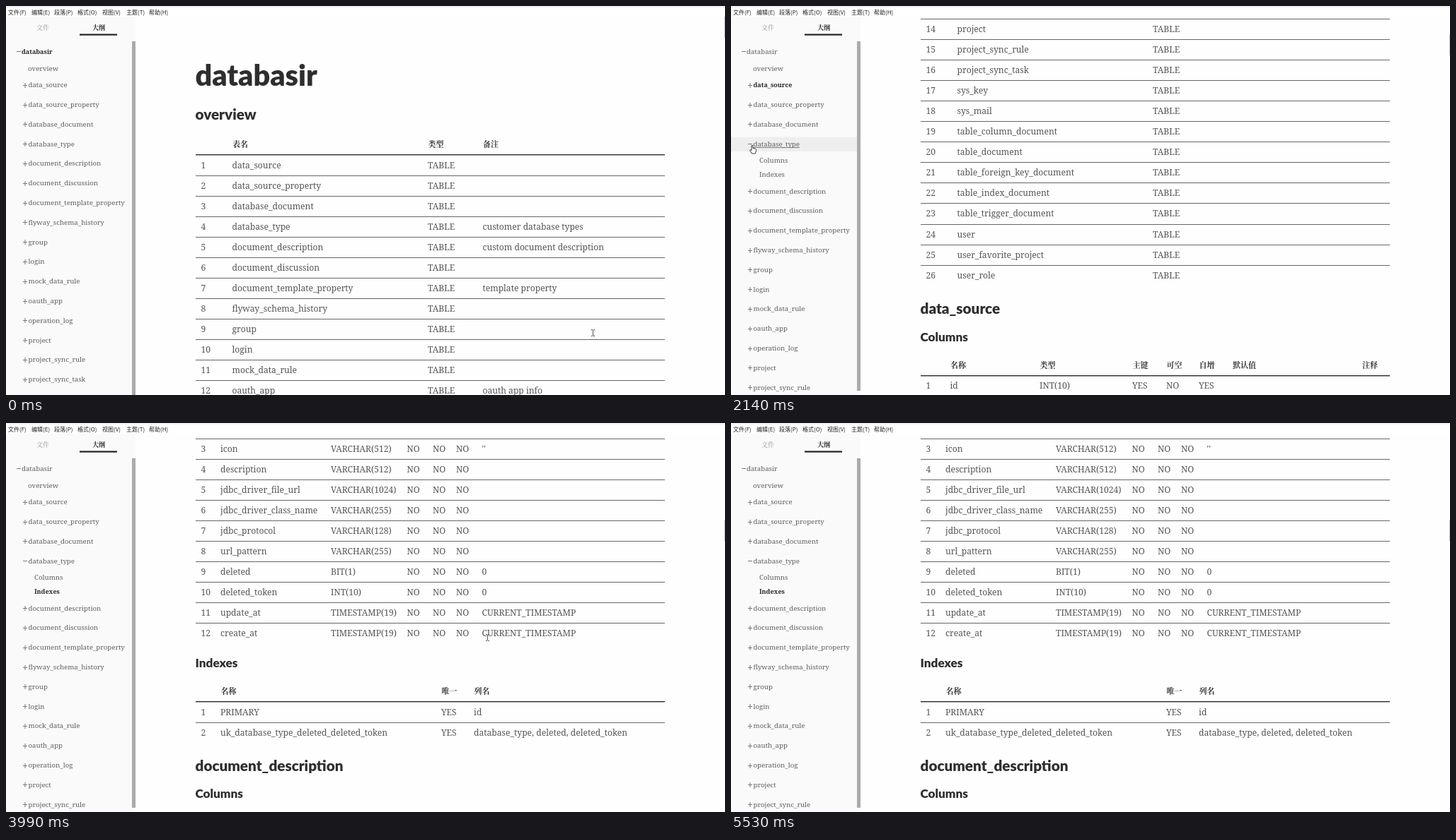
An HTML page with a canvas that plays this animation: 1016 by 551 pixels, repeating every 6590 ms.

```html
<!DOCTYPE html>
<html lang="zh">
<head>
<meta charset="utf-8">
<title>databasir</title>
<style>
  html, body { margin: 0; width: 100%; height: 100%; overflow: hidden; background: #fff; }
  canvas { display: block; width: 1016px; height: 551px; }
</style>
</head>
<body>
<canvas id="stage"></canvas>
<script>
const W = 1016, H = 551, LOOP = 6590, STEP = LOOP / 99;
const ROW = 29.09, LEFT = 268, RIGHT = 931, TOP = 15;
const TYPE_TOP = 2545;            // document offset of the database_type section
const CJK = '"Noto Serif CJK SC", "Noto Sans CJK SC", "Noto Sans CJK", serif';
const FONT = {
  body: '300 12.12px "Noto Serif", serif',
  side: '300 9.66px "Noto Serif", serif',
  sideBold: 'bold 9px "Noto Serif", serif',
  head: 'bold 11px ' + CJK,
  tab: '9px ' + CJK,
  tabBold: 'bold 9px ' + CJK,
  menu: '8px "Noto Sans CJK SC", "Noto Sans CJK", sans-serif',
  h1: '900 41.3px Lato, sans-serif',
  h2: '900 20.7px Lato, sans-serif',
  h3: '900 17.2px Lato, sans-serif'
};

const canvas = document.getElementById('stage');
const ctx = canvas.getContext('2d');
const dpr = window.devicePixelRatio || 1;
canvas.width = W * dpr;
canvas.height = H * dpr;

const names = ('data_source data_source_property database_document database_type ' +
  'document_description document_discussion document_template_property ' +
  'flyway_schema_history group login mock_data_rule oauth_app operation_log project ' +
  'project_sync_rule project_sync_task sys_key sys_mail table_column_document ' +
  'table_document table_foreign_key_document table_index_document ' +
  'table_trigger_document user user_favorite_project user_role').split(' ');

const notes = {
  database_type: 'customer database types',
  document_description: 'custom document description',
  document_template_property: 'template property',
  oauth_app: 'oauth app info'
};

// "name type value" lines into column rows; the first row is the primary key
const fields = list => list.split('\n').map((line, i) => {
  const [name, type, value = '', nullable = 'NO'] = line.trim().split(' ');
  const key = i ? 'NO' : 'YES';
  return [name, type, key, nullable, key, value];
});

const typeRows = fields(`id INT(10)
  database_type VARCHAR(128)
  icon VARCHAR(512) ''
  description VARCHAR(512)
  jdbc_driver_file_url VARCHAR(1024)
  jdbc_driver_class_name VARCHAR(255)
  jdbc_protocol VARCHAR(128)
  url_pattern VARCHAR(255)
  deleted BIT(1) 0
  deleted_token INT(10) 0
  update_at TIMESTAMP(19) CURRENT_TIMESTAMP
  create_at TIMESTAMP(19) CURRENT_TIMESTAMP`);
typeRows[1].push('such as mysql,\npostgresql,\nmysql5.5 and so\non');

const descRows = fields(`id INT(10)
  content TEXT(65535)
  project_id INT(10)
  table_name VARCHAR(255)
  column_name VARCHAR(255) null YES
  update_by INT(10)
  update_at TIMESTAMP(19) CURRENT_TIMESTAMP
  create_at TIMESTAMP(19) CURRENT_TIMESTAMP`);

const columnHeads = ['名称', '类型', '主键', '可空', '自增', '默认值', '注释'];
const tallHeads = columnHeads.map((h, i) => i > 1 && i < 5 ? h[0] + '\n' + h[1] : h);

const headings = [
  ['h1', 'databasir', 112.5], ['h2', 'overview', 161],
  ['h2', 'data_source', 1007], ['h3', 'Columns', 1045.5],
  ['h2', 'database_type', TYPE_TOP + 56], ['h3', 'Columns', TYPE_TOP + 94.5],
  ['h3', 'Indexes', TYPE_TOP + 578.5],
  ['h2', 'document_description', TYPE_TOP + 725.5], ['h3', 'Columns', TYPE_TOP + 764]
];

// y is the header rule of each table
const tables = [
  { y: 210.5, xs: [319.5, 596, 673.5], heads: ['表名', '类型', '备注'],
    rows: names.map(n => [n, 'TABLE', notes[n] || '']) },
  { y: 1094, xs: [309.5, 436, 567, 615, 661, 708.5, 891.5], heads: columnHeads,
    rows: fields('id INT(10)'), open: true },
  { y: TYPE_TOP + 156.5, xs: [303, 459, 566.5, 603, 636, 672.5, 822], heads: tallHeads,
    rows: typeRows },
  { y: TYPE_TOP + 627.5, xs: [303, 615, 661], heads: ['名称', '唯一', '列名'],
    rows: [['PRIMARY', 'YES', 'id'],
      ['uk_database_type_deleted_deleted_token', 'YES', 'database_type, deleted, deleted_token']] },
  { y: TYPE_TOP + 812.5, xs: [304, 425, 559.5, 607.5, 655.5, 703, 890.5], heads: columnHeads,
    rows: descRows, open: true }
];

// start, end, distance; equal times make a jump
const scrolls = [
  [270, 725, 255], [850, 1355, 316], [2320, 2320, TYPE_TOP - 571], [2990, 2990, 41.5],
  [3560, 3980, 191.25], [4100, 4580, 255], [4950, 5500, -255]
];

// time, x, y
const path = [
  [0, 828.5, 463], [480, 446, 201], [870, 446, 201], [1330, 434.5, 206], [1460, 434.5, 206],
  [1930, 31, 203], [2140, 31, 203], [2300, 56, 203], [2380, 56, 203], [2560, 72, 226],
  [2840, 72, 226], [2860, 70, 222], [2990, 70, 222], [3500, 680, 304], [3990, 680, 304],
  [4540, 538, 299], [4594, 538, 299], [4720, 471, 288.5]
];

const ease = p => (1 - Math.cos(Math.PI * Math.min(1, Math.max(0, p)))) / 2;

function scrollAt(t) {
  let y = 0;
  for (const [from, to, dist] of scrolls)
    y += dist * (from === to ? +(t >= from) : ease((t - from) / (to - from)));
  return y;
}

function cursorAt(t) {
  const i = path.findIndex(p => p[0] > t);
  if (i < 0) return path[path.length - 1].slice(1);
  const [t0, x0, y0] = path[i - 1], [t1, x1, y1] = path[i];
  const p = ease((t - t0) / (t1 - t0));
  return [x0 + (x1 - x0) * p, y0 + (y1 - y0) * p];
}

function activeAt(t) {
  if (t < 1220) return 'databasir';
  if (t < 2320) return 'data_source';
  if (t < 2990) return 'database_type';
  return t < 3850 ? 'Columns' : 'Indexes';
}

// baselines sit on whole pixels
function text(str, x, y, font, color) {
  ctx.font = FONT[font];
  ctx.fillStyle = color;
  ctx.fillText(str, x, Math.round(y));
}

function rect(x, y, w, h, color) {
  ctx.fillStyle = color;
  ctx.fillRect(x, y, w, h);
}

function lines(str, x, y, gap, font, color) {
  str.split('\n').forEach((s, i) => text(s, x, y + i * gap, font, color));
}

function drawTable({ y, xs, heads, rows, open }, scroll) {
  y -= scroll;
  heads.forEach((h, i) => {
    const extra = h.split('\n').length - 1;
    lines(h, xs[i] + .5, y - 10.5 - extra * 13.5, 13.5, 'head', '#333');
  });
  rect(LEFT, Math.round(y - .5), RIGHT - LEFT, 1.4, '#2a2a2a');
  rows.forEach((row, i) => {
    const base = y + 19;
    text(String(i + 1), 275.5, base, 'body', '#555');
    let tall = 1;
    row.forEach((cell, j) => {
      if (!cell) return;
      tall = Math.max(tall, cell.split('\n').length);
      lines(cell, xs[j], base, 13.25, 'body', '#555');
    });
    y += ROW + (tall - 1) * 13.25;
    if (open || i < rows.length - 1)
      rect(LEFT, Math.round(y), RIGHT - LEFT, 1, '#666');
  });
}

function drawPage(t) {
  const scroll = scrollAt(t);
  ctx.save();
  ctx.beginPath();
  ctx.rect(184, TOP, W - 184, H - TOP);
  ctx.clip();
  for (const [font, str, y] of headings)
    if (Math.abs(y - scroll - H / 2) < H) text(str, LEFT - .5, y - scroll, font, '#2e2e2e');
  for (const table of tables)
    if (table.y - scroll < H + 60 && table.y + table.rows.length * 33 > scroll) drawTable(table, scroll);
  rect(W - 1, TOP + scroll * .044, 1, 30, '#c4c4c4');
  ctx.restore();
}

function outline(open) {
  const items = [
    { name: 'databasir', x: 22, y: 64.5, sign: '-' },
    { name: 'overview', x: 31, y: 88.5 }
  ];
  let y = 112.2;
  for (const name of names) {
    const opened = open && name === 'database_type';
    items.push({ name, x: 31.5, y, sign: opened ? '-' : '+' });
    if (opened) {
      items.push({ name: 'Columns', x: 40, y: y + 23.6 }, { name: 'Indexes', x: 40, y: y + 43.3 });
      y += 39.2;
    }
    y += 27.8;
    if (y > H + 10) break;
  }
  return items;
}

function drawSign(sign, x, y) {
  x = Math.round(x);
  y = Math.round(y);
  rect(x, y, 6, 1, '#777');
  if (sign === '+') rect(x + 2.5, y - 3, 1, 7, '#777');
}

function drawSide(t, cx, cy) {
  const open = t >= 2120, active = activeAt(t);
  rect(0, TOP, 183, H - TOP, '#fafafa');
  text('文件', 43, 33.5, 'tab', '#999');
  text('大纲', 122, 33.5, 'tabBold', '#222');
  rect(104, 39.5, 53, 2.2, '#222');
  for (const { name, x, y, sign } of outline(open)) {
    const hover = cx < 178 && Math.abs(cy - 6 - y) < 10;
    const bold = name === active;
    const color = bold ? '#2a2a2a' : '#606060';
    if (hover) rect(0, y - 10, 178, 20.5, '#eeeeee');
    text(name, x, y + 3, bold ? 'sideBold' : 'side', color);
    if (hover) rect(x, Math.round(y + 4), ctx.measureText(name).width, .8, color);
    if (sign) drawSign(sign, x - 7.5, y - .5);
  }
  rect(178, 50, 5, open ? 495 : H - 50, '#ababab');
}

function drawMenu() {
  rect(0, 0, W, TOP, '#fff');
  rect(0, 0, W, 2, '#f1f1f1');
  const xs = [3, 36, 68, 101, 136, 170, 202];
  '文件(F) 编辑(E) 段落(P) 格式(O) 视图(V) 主题(T) 帮助(H)'.split(' ')
    .forEach((label, i) => text(label, xs[i], 12, 'menu', '#222'));
}

function drawBeam(x, y) {
  x = Math.round(x);
  y = Math.round(y);
  rect(x, y - 4, 1, 8, '#555');
  for (const dy of [-5, 4]) {
    rect(x - 2, y + dy, 2, 1, '#555');
    rect(x + 1, y + dy, 2, 1, '#555');
  }
}

function drawHand(x, y) {
  ctx.save();
  ctx.translate(x, y);
  ctx.beginPath();
  ctx.moveTo(-2, 1.5);
  ctx.lineTo(-2, -5);
  ctx.quadraticCurveTo(-1, -7, 0, -5);
  ctx.lineTo(0, -1.5);
  ctx.lineTo(3.4, -.8);
  ctx.quadraticCurveTo(4.8, -.2, 4.6, 1.5);
  ctx.lineTo(3.4, 6);
  ctx.lineTo(-1.6, 6);
  ctx.lineTo(-4.4, 1.6);
  ctx.quadraticCurveTo(-4, 0, -2, 1.5);
  ctx.closePath();
  ctx.fillStyle = '#fff';
  ctx.fill();
  ctx.strokeStyle = '#222';
  ctx.lineWidth = .9;
  ctx.stroke();
  ctx.restore();
}

function draw(t) {
  const [cx, cy] = cursorAt(t);
  ctx.setTransform(dpr, 0, 0, dpr, 0, 0);
  rect(0, 0, W, H, '#fefefe');
  drawPage(t);
  drawSide(t, cx, cy);
  drawMenu();
  if (t < 4780) (cx < 178 ? drawHand : drawBeam)(cx, cy);
}

const start = performance.now();
function tick() {
  const t = (performance.now() - start) % LOOP;
  draw(Math.min(98, Math.floor((t + 8) / STEP)) * STEP);
  requestAnimationFrame(tick);
}
tick();
</script>
</body>
</html>
```
